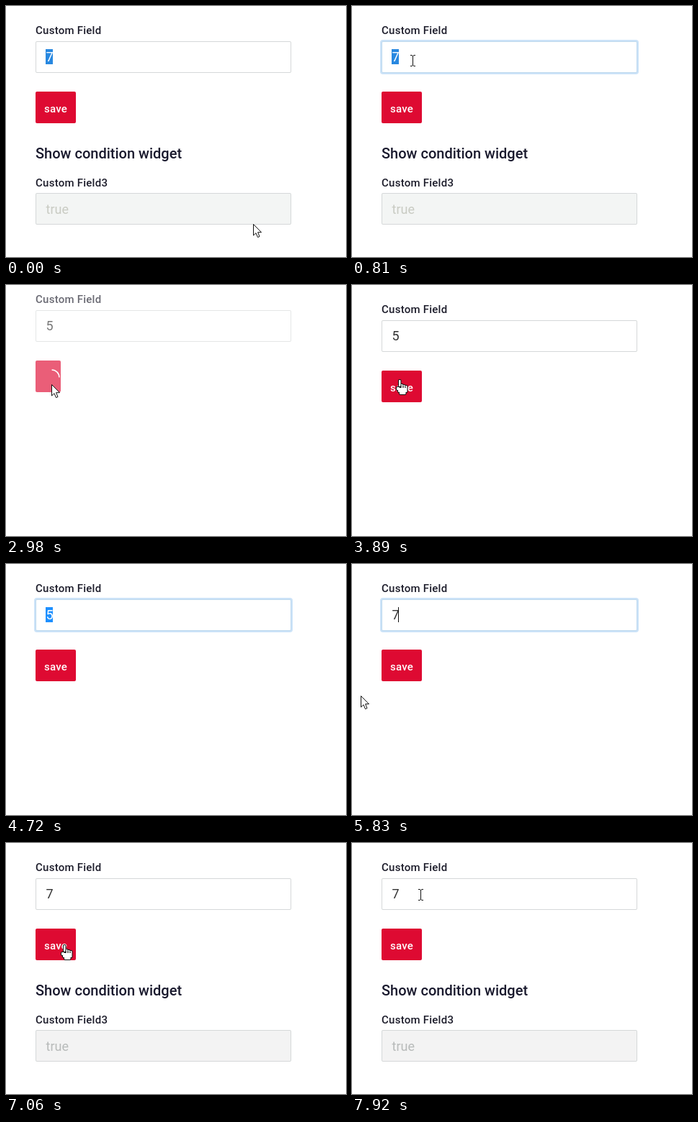
An HTML page with a canvas that plays this animation: 472x349 px, repeating every 8000 ms.

```html
<!DOCTYPE html>
<html lang="en">
<head>
<meta charset="utf-8">
<title>Conditional widget form</title>
<style>
html, body { margin: 0; width: 100%; height: 100%; overflow: hidden; background: #fff; }
canvas { display: block; width: 472px; height: 349px; }
</style>
</head>
<body>
<canvas id="stage"></canvas>
<script>
const W = 472, H = 349, LOOP = 8000;
const canvas = document.getElementById('stage');
const ctx = canvas.getContext('2d');
const dpr = window.devicePixelRatio || 1;
canvas.width = W * dpr;
canvas.height = H * dpr;

const FONT = 'Roboto, "Open Sans", sans-serif';
const INK = '#1d1d2b', RED = '#de0a32', DARK = '#111';

// moments of the story
const TYPE_A = 1920, CLICK_A = 2770, LOAD_A = 2865;
const TYPE_B = 5550, CLICK_B = 6370, LOAD_B = 6460;
const DRAG = 4600;

const FIELD = { x: 84, y: 76 }, AWAY = { x: -20, y: 87 };
const MOVES = [
  { from: 30, to: 780, goal: FIELD },
  { from: 840, to: 1260, goal: AWAY },
  { from: 2260, to: 2720, goal: { x: 63, y: 138 } },
  { from: 3830, to: 4560, goal: FIELD, bend: { x: 60, y: -155 } },
  { from: DRAG, to: 4720, goal: AWAY },
  { from: TYPE_B, to: 6300, goal: { x: 81, y: 130 }, bend: { x: 0, y: 190 } },
  { from: LOAD_B, to: 6600, goal: { x: 81, y: 141 } },
  { from: 7060, to: 7920, goal: { x: 95, y: 72 }, bend: { x: 90, y: 225 } }
];

const fade = (t, at, span) => Math.min(1, Math.max(0, (t - at) / span));
const smooth = u => u * u * (3 - 2 * u);
const easeOut = u => 1 - (1 - u) ** 3;

// eased moves from stop to stop; bend lifts the middle off the straight line
function pointer(t) {
  let at = { x: 343, y: 303 };
  for (const { from, to, goal, bend = { x: 0, y: 0 } } of MOVES) {
    if (t < from) break;
    const u = smooth(fade(t, from, to - from)), lift = 2 * u * (1 - u);
    const along = k => at[k] + (goal[k] - at[k]) * u + bend[k] * lift;
    at = { x: along('x'), y: along('y') };
  }
  return at;
}

function pageShown(t) {
  if (t >= LOAD_B) return easeOut(fade(t, LOAD_B, 270));
  return t >= LOAD_A ? easeOut(fade(t, LOAD_A, 385)) : 1;
}

function focus(t) {
  return fade(t, 640, 150) - fade(t, CLICK_A, 80) + fade(t, DRAG - 20, 130) - fade(t, CLICK_B, 50);
}

function box(x, y, w, h, r, fill) {
  ctx.fillStyle = fill;
  ctx.beginPath();
  ctx.roundRect(x, y, w, h, r);
  ctx.fill();
}

function text(str, x, y, size, weight, color, spacing = 0) {
  ctx.font = `${weight} ${size}px ${FONT}`;
  ctx.letterSpacing = spacing + 'px';
  ctx.fillStyle = color;
  ctx.fillText(str, x, y);
}

function mix(a, b, k) {
  return `rgb(${a.map((v, i) => Math.round(v + (b[i] - v) * k))})`;
}

function input(y, fill, border) {
  box(41, y, 355, 44, 2, border);
  box(42, y + 1, 353, 42, 1, fill);
}

function drawField(t) {
  text('Custom Field', 41, 39, 15, 500, INK, 0.25);
  const k = focus(t);
  if (k > 0) box(39, 47, 359, 48, 4, `rgba(170,208,243,${0.6 * k * k})`);
  input(49, '#fff', mix([213, 216, 217], [190, 217, 238], k));

  const selected = t < TYPE_A || (t >= DRAG && t < TYPE_B);
  if (selected) box(55, 60, 10, 21, 0, t < TYPE_A ? '#2888e0' : '#1e90ff');
  const value = t >= TYPE_A && t < TYPE_B ? '5' : '7';
  text(value, 55.5, 77, 18, 400, selected ? '#fff' : '#333');

  const typing = (t >= TYPE_A && t < CLICK_A) || (t >= TYPE_B && t < CLICK_B);
  const sinceKey = t - (t < TYPE_B ? TYPE_A : TYPE_B);
  if (typing && sinceKey % 1060 < 530) box(64, 60, 1, 21, 0, DARK);
}

function drawButton(t, shown) {
  if (shown > 0.85) {
    box(41, 119, 56, 44, 2, RED);
    text('save', 53, 148, 15, 500, '#fff', 0.2);
    return;
  }
  ctx.save();
  box(41, 119, 35, 44, 2, RED);
  ctx.clip();
  ctx.strokeStyle = '#fff';
  ctx.lineWidth = 1.5;
  const turn = (t - LOAD_A - 115) / 750 * 2 * Math.PI;
  ctx.beginPath();
  ctx.arc(63.5, 142.5, 10.5, turn - Math.PI / 2, turn);
  ctx.stroke();
  ctx.restore();
}

function drawWidget(t) {
  const late = t >= CLICK_B;
  text('Show condition widget', 41, 212, 20, 500, '#1a1a2e');
  text('Custom Field3', 41, 251, 15, 500, INK, 0.25);
  input(260, late ? '#f3f3f3' : '#f3f5f4', '#d5d8d9');
  text('true', 55.5, 289, 18, 400, late ? '#b8bbba' : '#c9cbc3');
}

function drawArrow() {
  const outline = [[0.5, 0.5], [0.5, 16], [4, 12.7], [6.5, 18.6], [9, 17.5], [6.6, 11.7], [11.5, 11.7]];
  ctx.beginPath();
  outline.forEach(([x, y]) => ctx.lineTo(x, y));
  ctx.closePath();
  ctx.fillStyle = '#fff';
  ctx.fill();
  ctx.stroke();
}

function drawHand() {
  const layers = [[1, DARK], [0, '#fff']];
  for (const [grow, color] of layers) {
    const part = (x, y, w, h) => box(x - grow, y - grow, w + 2 * grow, h + 2 * grow, 1 + grow, color);
    for (let i = 0; i < 4; i++) part(3 * i - 1, i ? 6 + i : 1, 2.5, 9);
    part(-4, 11, 4, 4);
    part(-2, 12, 12, 6);
    part(0, 16, 8.5, 5);
  }
  for (let i = 1; i < 4; i++) box(3 * i - 1.2, 7 + i, 0.8, 5 - i, 0, DARK);
}

function drawBeam() {
  ctx.beginPath();
  for (const s of [-1, 1]) {
    ctx.moveTo(-3, 7.5 * s);
    ctx.lineTo(-1, 7.5 * s);
    ctx.lineTo(0.5, 6.5 * s);
    ctx.lineTo(2, 7.5 * s);
    ctx.lineTo(4, 7.5 * s);
  }
  ctx.moveTo(0.5, -6.5);
  ctx.lineTo(0.5, 6.5);
  ctx.stroke();
}

function drawPointer(t, loading) {
  const { x, y } = pointer(t);
  if (x < -15) return;
  if ((t >= CLICK_A && t < LOAD_A) || (t >= CLICK_B && t < LOAD_B)) {
    ctx.fillStyle = 'rgba(234,140,24,.88)';
    ctx.beginPath();
    ctx.arc(x - 1, y, 12, 0, 2 * Math.PI);
    ctx.fill();
  }
  const over = (left, top, right, bottom) => x >= left && x < right && y >= top && y < bottom;
  ctx.save();
  ctx.translate(Math.round(x), Math.round(y));
  ctx.strokeStyle = DARK;
  ctx.lineWidth = 1;
  ctx.lineJoin = 'round';
  if (!loading && over(41, 119, 97, 163)) drawHand();
  else if (over(41, 49, 396, 93) || over(41, 20, 132, 45)) drawBeam();
  else drawArrow();
  ctx.restore();
}

function draw(t) {
  ctx.setTransform(dpr, 0, 0, dpr, 0, 0);
  box(0, 0, W, H, 0, '#fff');

  const shown = pageShown(t);
  ctx.save();
  ctx.translate(0, Math.round(-40 * (1 - shown)));
  drawField(t);
  drawButton(t, shown);
  if (t < CLICK_A || t >= CLICK_B) drawWidget(t);
  ctx.restore();

  // white veil fades the page as one layer
  box(0, 0, W, H, 0, `rgba(255,255,255,${1 - shown})`);
  drawPointer(t, shown < 1);
}

const start = performance.now();
function tick() {
  draw((performance.now() - start) % LOOP);
  requestAnimationFrame(tick);
}
tick();
</script>
</body>
</html>
```
